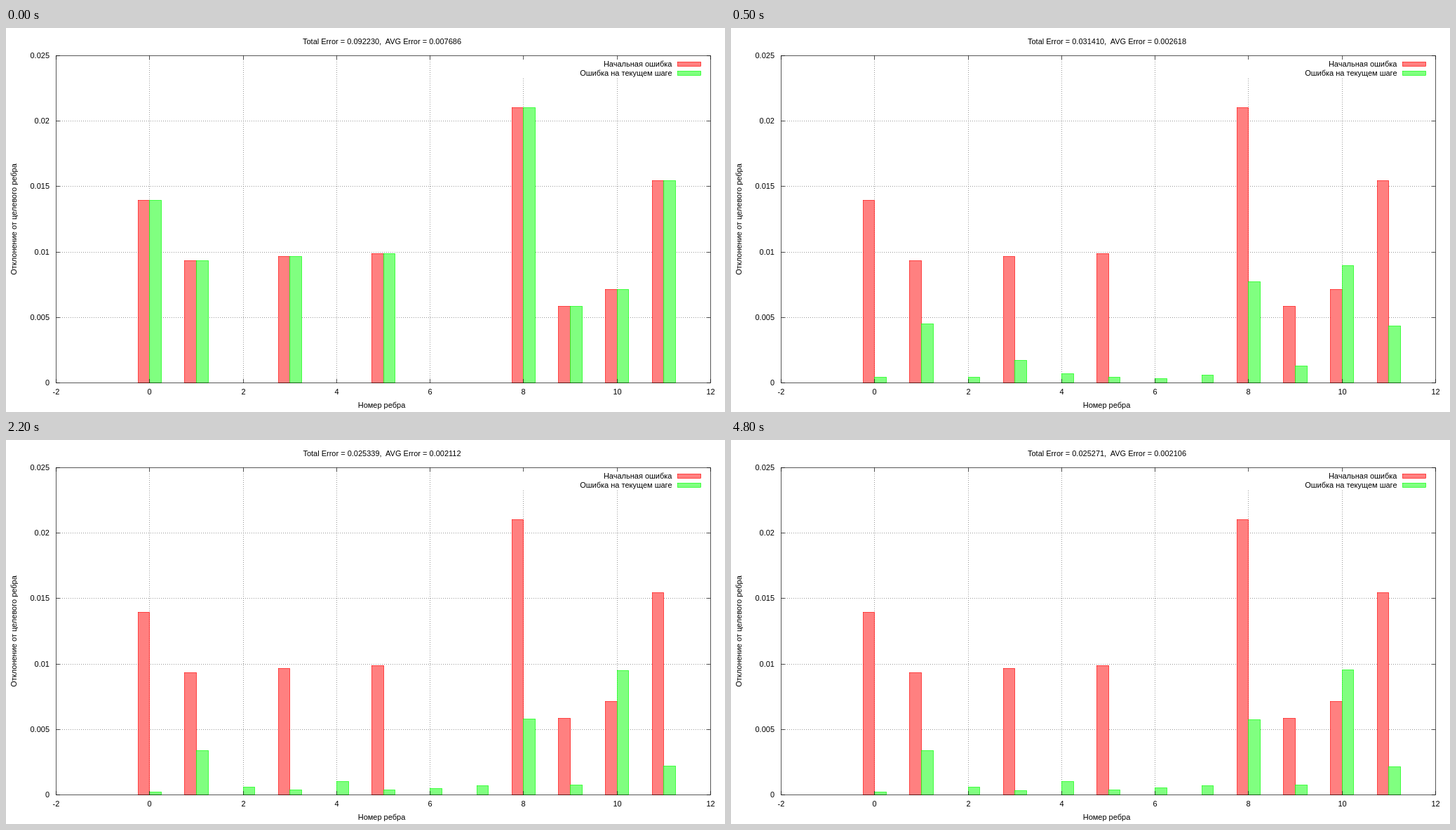
Recreate the animation shown at these times as an HTML page. Size 1025 by 547 pixels, loop 5 s.

```html
<!DOCTYPE html>
<html lang="ru">
<head>
<meta charset="utf-8">
<title>Отклонение рёбер</title>
<style>
  html, body { margin: 0; width: 100%; height: 100%; overflow: hidden; background: #fff; }
  svg { display: block; width: 1025px; height: 547px; }
  text { font: 11px "Liberation Sans", Arial, sans-serif; white-space: pre; }
  rect, path { stroke-width: 0.65; }
  .start { fill: #ff8080; stroke: #f00; }
  .now { fill: #80ff80; stroke: #0f0; }
  .grid { fill: none; stroke: #606060; stroke-dasharray: 1 2; }
  .axis { fill: none; stroke: #000; }
</style>
</head>
<body>
<svg viewBox="0 0 1025 547"></svg>
<script>
const LEFT = 71, RIGHT = 1004, TOP = 39, BOTTOM = 505, LOOP = 5000;
const svg = document.querySelector('svg');

// Errors are in units of 0.00001. Each solver step keeps the given share
// of an edge's distance to its resting error.
const edge = (start, rest, keep) => ({ start, rest, keep });
const edges = [
  edge(1393, 20, 0.36), edge(934, 335, 0.66), edge(0, 60, 0.7),
  edge(964, 33, 0.62), edge(0, 103, 0.75), edge(986, 40, 0.2),
  edge(0, 53, 0.8), edge(0, 69, 0.65), edge(2103, 575, 0.6),
  edge(583, 75, 0.57), edge(716, 953, 0.7), edge(1544, 212, 0.64)
];
const errorAt = ({ start, rest, keep }, step) =>
  (rest + (start - rest) * keep ** step) / 1e5;

// Moments, in ms, at which a solver step becomes visible.
const stepTimes = [
  100, 300, 400, 500, 600, 700, 900, 1000, 1100,
  1300, 1500, 2200, 2600, 3000, 4300, 4600, 4800
];

function add(tag, attrs, content = '') {
  const el = document.createElementNS('http://www.w3.org/2000/svg', tag);
  for (const name in attrs) el.setAttribute(name, attrs[name]);
  el.textContent = content;
  return svg.appendChild(el);
}

const label = (x, y, content, anchor = 'middle', extra = {}) =>
  add('text', { x, y, 'text-anchor': anchor, ...extra }, content);
const line = (cls, d) => add('path', { class: cls, d });

// Coordinates snap to pixel centres.
const xAt = v => Math.round(LEFT + (v + 2) * (RIGHT - LEFT) / 14) + 0.5;
const yAt = v => Math.round(BOTTOM - v * (BOTTOM - TOP) / 0.025) + 0.5;

function bar(cls, from) {
  const x = xAt(from);
  return add('rect', { class: cls, x, width: xAt(from + 0.25) - x });
}

function setValue(rect, value) {
  const y = yAt(value), height = yAt(0) - y;
  rect.setAttribute('y', y);
  rect.setAttribute('height', height);
  rect.setAttribute('visibility', height ? 'visible' : 'hidden');
}

// Grid; the two lines under the legend start below it.
for (let v = 0; v <= 10; v += 2)
  line('grid', `M${xAt(v)} ${BOTTOM}V${v >= 8 ? 72 : TOP}`);
for (let i = 1; i < 5; i++)
  line('grid', `M${LEFT} ${yAt(i * 0.005)}H${RIGHT}`);

edges.forEach((e, i) => setValue(bar('start', i - 0.25), errorAt(e, 0)));
const nowBars = edges.map((_, i) => bar('now', i));

// Frame, ticks and tick labels.
add('rect', { class: 'axis', x: LEFT + 0.5, y: TOP + 0.5, width: RIGHT - LEFT, height: BOTTOM - TOP });
for (let v = -2; v <= 12; v += 2) {
  const x = xAt(v);
  line('axis', `M${x} ${TOP + 0.5}v5.5M${x} ${BOTTOM + 0.5}v-5.5`);
  label(x, 522, v);
}
for (let i = 0; i <= 5; i++) {
  const v = i * 5 / 1000, y = yAt(v);
  line('axis', `M${LEFT + 0.5} ${y}h5.5M${RIGHT + 0.5} ${y}h-5.5`);
  label(62, y + 3.5, v, 'end');
}

label(535.5, 541, 'Номер ребра');
label(0, 0, 'Отклонение от целевого ребра', 'middle', { transform: 'translate(15 272.5) rotate(-90)' });

[['start', 'Начальная ошибка'], ['now', 'Ошибка на текущем шаге']].forEach(([cls, name], i) => {
  label(949.5, 55 + 13 * i, name, 'end');
  add('rect', { class: cls, x: 957.5, y: 48.5 + 13 * i, width: 33, height: 6 });
});
const title = label(536, 23, '');

function draw(time) {
  const step = stepTimes.filter(t => t <= time).length;
  const errors = edges.map(e => errorAt(e, step));
  nowBars.forEach((rect, i) => setValue(rect, errors[i]));
  const total = errors.reduce((sum, e) => sum + e);
  const average = total / edges.length;
  title.textContent = `Total Error = ${total.toFixed(6)},  AVG Error = ${average.toFixed(6)}`;
}

const begin = performance.now();
function tick() {
  draw((performance.now() - begin) % LOOP);
  requestAnimationFrame(tick);
}
tick();
</script>
</body>
</html>
```
